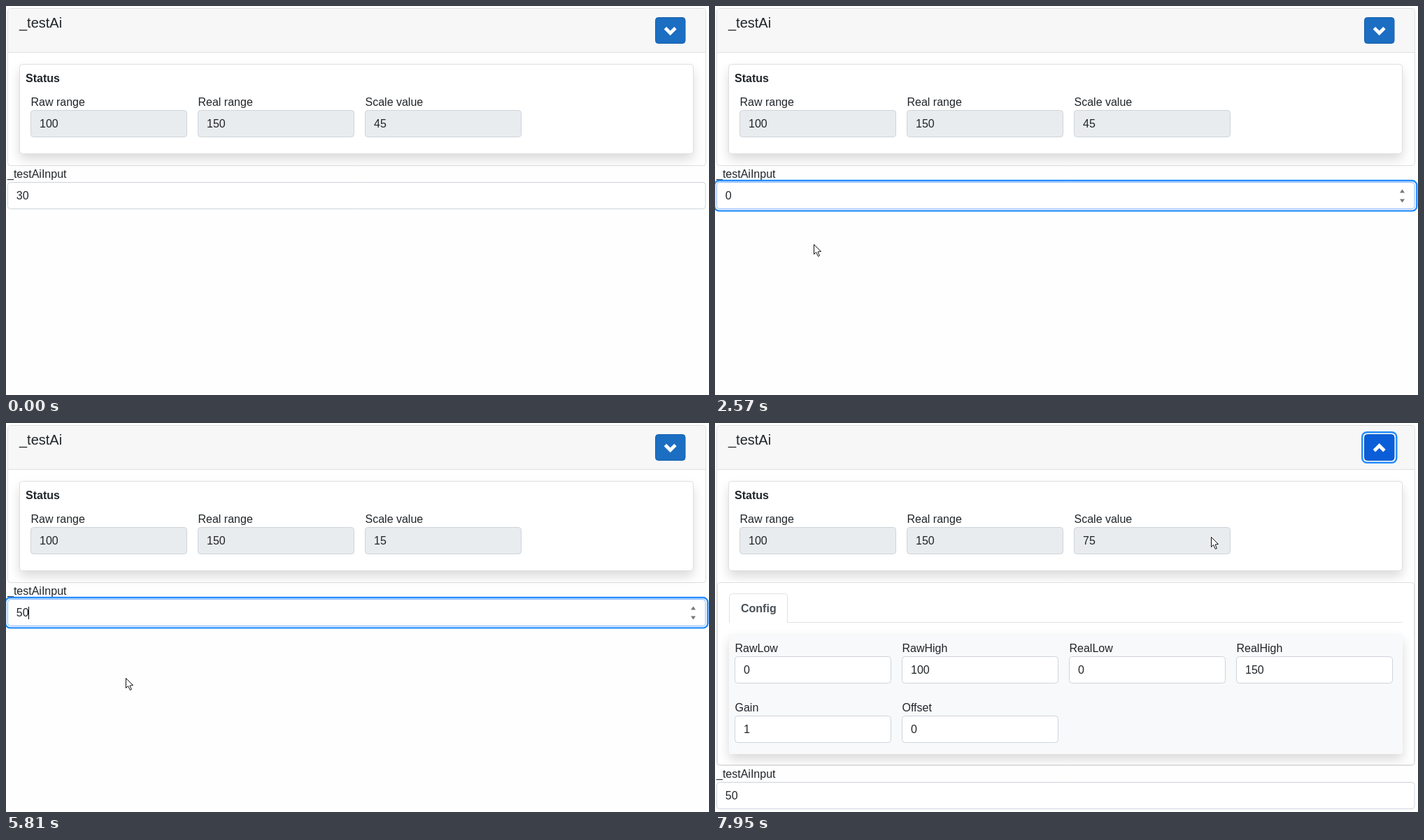
Write an HTML page with a canvas that moves like this. It is 1005 by 557 pixels and loops after 8 s.

```html
<!DOCTYPE html>
<html lang="en">
<head>
<meta charset="utf-8">
<title>Input scaling panel</title>
<style>
html, body { margin: 0; width: 100%; height: 100%; overflow: hidden; background: #fefefe; }
canvas { display: block; }
</style>
</head>
<body>
<canvas id="stage" width="1005" height="557"></canvas>
<script>
const ctx = document.getElementById('stage').getContext('2d');
const LOOP = 8000, STEP = 70, FADE = 150, BLINK = 490, GAIN = 1.5;
const ENTER = 310, HOVER = 6860, TOGGLE = 7530;
const INK = '#212529', LINE = '#ced4da', CARD_LINE = '#dfdfdf', COLUMN = 239;

// Mouse stops: departure, arrival, x, y
const moves = [
  [ENTER, 740, 46, 271], [1140, 1910, 29, 271],
  [2110, 2370, 141, 341], [3630, 3840, 179, 350],
  [4570, 4780, 29, 271], [4920, 5200, 160, 348], [5600, 5810, 171, 365],
  [6150, 6650, 973, 26], [6790, 7000, 952, 38], [7670, 7950, 709, 163]
];
const edits = [[0, '30'], [2080, '0'], [3360, '10'], [5000, '1'], [5130, ''], [5400, '5'], [5540, '50']];
// Input focus: gained, lost, result shown
const visits = [[2040, 3560, 4240], [4850, 6080, 6650]];
const presses = [...visits.flatMap(([on, off]) => [on, off]), TOGGLE];

const clamp = v => Math.max(0, Math.min(1, v));
const fade = (t, start) => clamp((t - start) / FADE);
const lastEdit = t => edits.filter(([time]) => time <= t).pop();
const mix = (a, b, k) => `rgb(${a.map((v, i) => Math.round(v + (b[i] - v) * k))})`;
const ease = p => 1 - (1 - p ** 1.3) ** 3;
const quantize = ms => Math.floor(ms / STEP + 1e-6) * STEP;

function mouseAt(t) {
  let x = 240, y = 575;
  for (const [start, end, toX, toY] of moves) {
    if (t < start) break;
    const k = clamp((quantize(t - start) + STEP) / (end - start));
    x += (toX - x) * k;
    y += (toY - y) * k;
  }
  return { x, y, overInput: y > 252 && y < 291, overButton: x > 928 && x < 972 && y > 16 && y < 54 };
}

function scaledValue(t) {
  const done = visits.filter(visit => visit[2] <= t).pop();
  return GAIN * lastEdit(done ? done[1] : 0)[1];
}

function text(str, x, y, size = 16, color = INK, weight = '') {
  ctx.font = `${weight} ${size}px "Liberation Sans", Arial, sans-serif`;
  ctx.fillStyle = color;
  ctx.fillText(str, x, y);
}

function paint(fill, line, width = 1) {
  if (fill) { ctx.fillStyle = fill; ctx.fill(); }
  if (line) { ctx.strokeStyle = line; ctx.lineWidth = width; ctx.stroke(); }
}

function box(x1, y1, x2, y2, fill, line, radius = 4) {
  ctx.beginPath();
  ctx.roundRect(x1, y1, x2 - x1, y2 - y1, radius);
  paint(fill, line);
}

function shadowBox(x1, y1, x2, y2, fill, line) {
  ctx.save();
  ctx.shadowColor = 'rgba(0,0,0,.15)';
  ctx.shadowBlur = 16;
  ctx.shadowOffsetY = 8;
  box(x1, y1, x2, y2, fill);
  ctx.restore();
  box(x1, y1, x2, y2, fill, line);
}

function trace(points, closed) {
  ctx.beginPath();
  points.forEach(([x, y]) => ctx.lineTo(x, y));
  if (closed) ctx.closePath();
}

function bar(x, y, w, h, color) {
  ctx.fillStyle = color;
  ctx.fillRect(x, y, w, h);
}

function ring(x1, y1, x2, y2, amount) {
  ctx.globalAlpha = amount;
  for (const [spread, color] of [[4 * amount, '#258cfb'], [1.6 * amount, '#fff']])
    box(x1 - spread, y1 - spread, x2 + spread, y2 + spread, color, null, 4 + spread);
  ctx.globalAlpha = 1;
}

function field(label, value, x, y, readonly) {
  text(label, x, y - 6.5);
  box(x, y, x + 223, y + 38, readonly ? '#e9ecef' : '#fff', LINE);
  text(value, x + 12.5, y + 24.5);
}

function toggleButton(t) {
  const open = t >= TOGGLE, hover = fade(t, HOVER), flip = open ? -1 : 1;
  ring(928, 16, 971.5, 54, fade(t, TOGGLE));
  box(928.5, 16.5, 971, 53.5, mix([27, 110, 194], [11, 94, 215], hover),
    mix([24, 97, 172], [10, 88, 202], hover));
  const middle = open ? 35.3 : 36;
  trace([-1, 0, 1].map(side => [949.7 + 7.3 * side, middle + flip * (side ? -4.5 : 2.8)]));
  paint(null, '#fff', 4.8);
}

function configPanel(height) {
  ctx.save();
  ctx.beginPath();
  ctx.rect(0, 228, 1005, height);
  ctx.clip();
  box(3.5, 228.5, 999.5, 489.5, '#fff', CARD_LINE);
  bar(103, 285, 880, 1, '#dee2e6');
  box(20.5, 244.5, 103.5, 285.5, '#fff', '#dee2e6', [4, 4, 0, 0]);
  bar(21, 285, 82, 1, '#fff');
  text('Config', 37, 271, 16, '#495057', 'bold');
  shadowBox(20, 302, 983, 474, '#f8f9fa');
  Object.entries({ RawLow: 0, RawHigh: 100, RealLow: 0, RealHigh: 150, Gain: 1, Offset: 0 })
    .forEach(([label, value], i) =>
      field(label, value, 28.5 + i % 4 * COLUMN, 334.5 + (i >> 2) * 85));
  ctx.restore();
}

function inputBox(t, mouse, dy) {
  const visit = visits.findIndex(([on, off]) => t >= on && t < off);
  const focus = visits.reduce((sum, [on, off]) => sum + fade(t, on) - fade(t, off), 0);
  const [editTime, value] = lastEdit(t);
  text('_testAiInput', 2, 246 + dy);
  ring(2, 252.8, 1000.5, 290.6, focus);
  box(2.5, 252.5 + dy, 1000, 290.5 + dy, '#fff', mix([206, 212, 218], [134, 183, 254], focus));
  text(value, 14.8, 277 + dy);
  if (visit >= 0) {
    const idle = t - Math.max(editTime, visits[visit][0]);
    // The first click lands before the last digit, the second one after it
    const column = value.length - (visit ? 0 : 1);
    if (idle % (2 * BLINK) < BLINK) bar(14 + Math.round(8.9 * column), 263, 1, 18, '#000');
  }
  if (visit >= 0 || (mouse.overInput && !dy)) {
    for (const side of [-1, 1]) {
      trace([[979, 272 + 4.5 * side], [986, 272 + 4.5 * side], [982.5, 272 + 9.5 * side]], true);
      paint('#777');
    }
  }
}

function cursor(t, { x, y, overInput, overButton }) {
  ctx.save();
  ctx.translate(Math.round(x), Math.round(y));
  if (presses.some(press => t >= press && t < press + STEP)) {
    ctx.globalCompositeOperation = 'multiply';
    ctx.beginPath();
    ctx.arc(-.5, 0, 10, 0, 7);
    paint('#ffff78');
    ctx.globalCompositeOperation = 'source-over';
  }
  if (overInput) {
    bar(0, -8, 1, 16, '#333');
    for (const end of [-8, 7]) bar(-3, end, 7, 1, '#333');
  } else if (overButton) {
    box(-5.5, 7.5, 9.5, 18.5, '#fff', '#000');
    box(-1.5, .5, 2.5, 12.5, '#fff', '#000', 2);
    bar(-1, 8, 3, 6, '#fff');
  } else {
    ctx.translate(.5, .5);
    trace([[0, 0], [0, 14], [3, 11], [6, 17], [8, 16], [5.5, 10.5], [10, 10]], true);
    paint('#fff', '#111');
  }
  ctx.restore();
}

function draw(now) {
  const t = now % LOOP, mouse = mouseAt(t);
  const dy = Math.round(262 * ease(clamp(quantize(t - TOGGLE) / 350)));

  bar(0, 0, 1005, 557, '#fefefe');
  box(2.5, 3.5, 1000.5, 228.5 + dy, '#fff', CARD_LINE);
  box(3, 4, 1000, 66, '#f7f7f7', null, [4, 4, 0, 0]);
  bar(3, 66, 997, 1, CARD_LINE);
  text('_testAi', 19, 31, 20);
  toggleButton(t);

  shadowBox(19.5, 83.5, 982.5, 211.5, '#fff', CARD_LINE);
  text('Status', 28, 109, 16, INK, 'bold');
  Object.entries({ 'Raw range': 100, 'Real range': 150, 'Scale value': scaledValue(t) })
    .forEach(([label, value], i) => field(label, value, 35.5 + i * COLUMN, 149.5, true));

  if (dy) configPanel(dy);
  inputBox(t, mouse, dy);
  if (t >= ENTER) cursor(t, mouse);
  requestAnimationFrame(() => draw(performance.now()));
}
draw(0);
</script>
</body>
</html>
```
